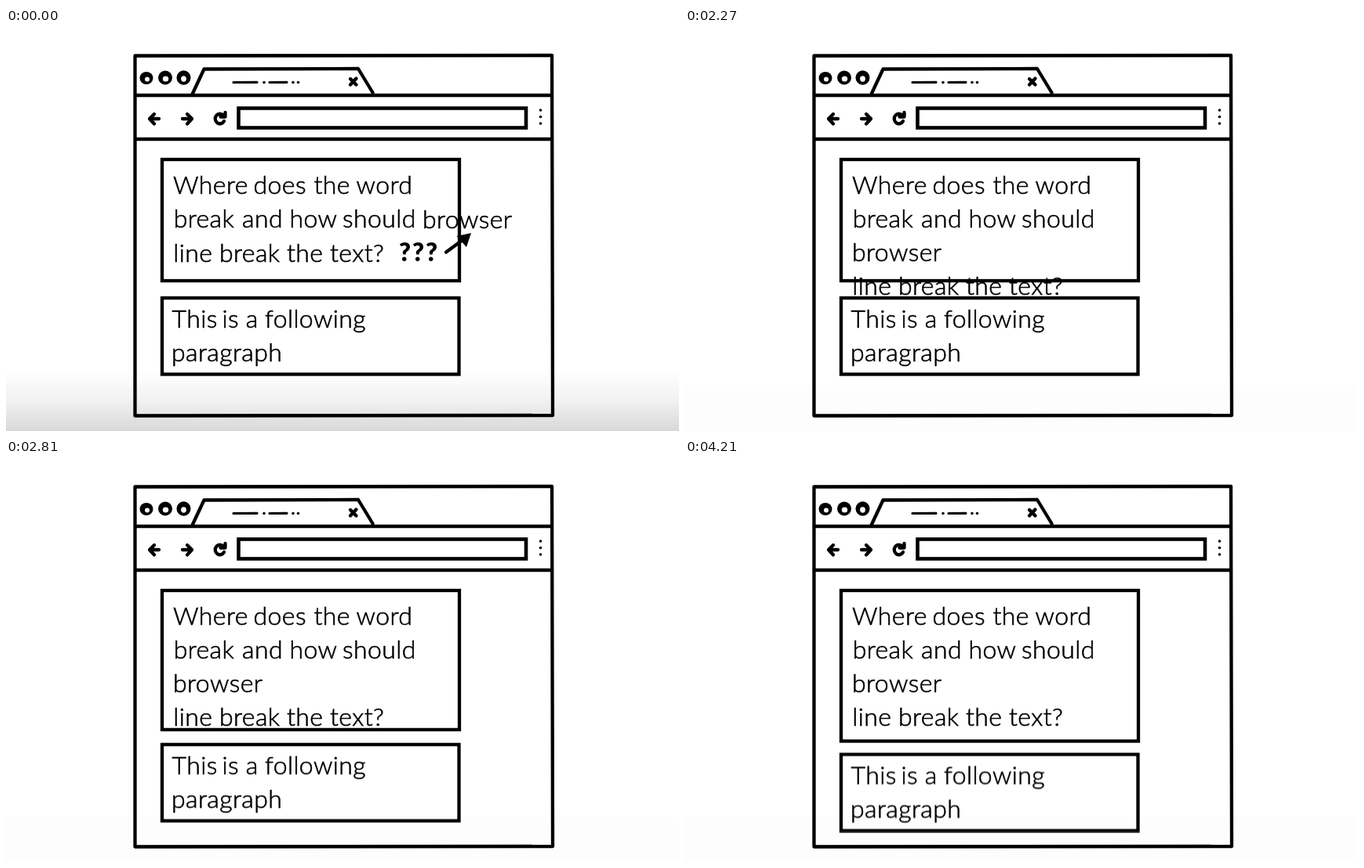
Recreate the animation shown at these times as an HTML page. Size 858 by 515 pixels, loop 4880 ms.

```html
<!DOCTYPE html>
<html lang="en">
<head>
<meta charset="utf-8">
<title>Line breaking</title>
<style>
  html, body { margin: 0; width: 100%; height: 100%; overflow: hidden; background: #fff; }
  svg { display: block; width: 858px; height: 515px; }

  .ink { fill: none; stroke: #000; stroke-width: 4.3; stroke-linecap: round; stroke-linejoin: round; }
  .box { stroke-linejoin: miter; }
  .dot { fill: #000; }
  text { font: 300 32px Lato, "Open Sans", sans-serif; letter-spacing: .4px; fill: #000; stroke: #000; stroke-width: .6px; }
  .marks text { font-weight: 900; letter-spacing: 0; stroke: none; }

  .shade, .marks, .old, .new, .first, .second { animation: 4880ms linear infinite; }
  .shade { animation-name: shade; }
  .marks { animation-name: marks; }
  .old { animation-name: leave; }
  .new { animation-name: enter; }
  .first { animation-name: grow; }
  .second { animation-name: push; }

  @keyframes shade { 0%, .2% { opacity: 1; } 8.2%, 100% { opacity: 0; } }
  @keyframes marks { 0%, 12.3% { opacity: 1; } 21.7%, 100% { opacity: 0; } }
  @keyframes leave { 0%, 23.57% { opacity: 1; } 33.8%, 100% { opacity: 0; } }
  @keyframes enter { 0%, 23.57% { opacity: 0; } 31.76%, 100% { opacity: 1; } }
  @keyframes grow {
    0% { height: 155px; }
    47.44% { height: 155px; animation-timing-function: cubic-bezier(.37, 0, .63, 1); }
    65.27%, 100% { height: 192.5px; }
  }
  @keyframes push {
    0% { transform: translateY(0); }
    47.44% { transform: translateY(0); animation-timing-function: cubic-bezier(.37, 0, .63, 1); }
    65.27%, 100% { transform: translateY(32.5px); }
  }
</style>
</head>
<body>
<svg viewBox="0 0 858 515">
  <defs>
    <linearGradient id="dusk" x1="0" y1="0" x2="0" y2="1">
      <stop offset="0" stop-opacity="0"/>
      <stop offset=".5" stop-opacity=".045"/>
      <stop offset="1" stop-opacity=".145"/>
    </linearGradient>
    <g id="last-line">
      <text><tspan x="213.2">line</tspan> <tspan x="272">break</tspan> <tspan x="358">the</tspan> <tspan x="413">text?</tspan></text>
    </g>
  </defs>

  <rect y="457" width="858" height="58" fill="#fdfdfd"/>
  <rect class="shade" y="437" width="858" height="78" fill="url(#dusk)"/>

  <!-- Browser window -->
  <g class="ink">
    <path d="M164.5 35.5L696 35L697 495L164.5 495.5Z"/>
    <path d="M165 86H696M165 142H696"/>
    <path d="M238 83.5L252.5 52.5L449 52L467.5 82.5"/>
    <path stroke-width="3.2" d="M290 69.5L320 69.3M336 69.5L358 69.3"/>
    <path d="M439 65L446.5 72.5M446.5 64.5L439 72.5"/>
    <path d="M195 116H183M189 110L183 116L189 122.5"/>
    <path d="M225 116H237M231 110L237 116L231 122.5"/>
    <path d="M277 111.5A6 6.3 0 1 0 278 119M279.5 108V113.5H273.5"/>
    <rect class="box" x="296.5" y="102.5" width="366.5" height="25" stroke-width="4.6"/>
  </g>

  <!-- Hand-drawn window buttons: a blob with a low, small hole -->
  <g class="dot">
    <ellipse cx="179" cy="64" rx="8.5" ry="8"/>
    <ellipse cx="203" cy="63.5" rx="9" ry="9"/>
    <ellipse cx="226.5" cy="63.5" rx="9" ry="9.3"/>
  </g>
  <g fill="#fff">
    <ellipse cx="180" cy="65.5" rx="3" ry="3"/>
    <ellipse cx="203.5" cy="65" rx="3.7" ry="3.6"/>
    <ellipse cx="226.5" cy="65" rx="3.4" ry="3.7"/>
  </g>
  <g class="dot">
    <circle cx="329" cy="69.5" r="1.8"/>
    <circle cx="366" cy="69.5" r="1.8"/>
    <circle cx="372.5" cy="69.5" r="1.8"/>
    <circle cx="681.5" cy="105" r="1.8"/>
    <circle cx="681.5" cy="113.5" r="1.8"/>
    <circle cx="681.5" cy="122" r="1.8"/>
  </g>

  <!-- First paragraph -->
  <rect class="ink box first" x="199" y="168" width="379" height="155"/>
  <text y="212.3"><tspan x="213">Where</tspan> <tspan x="315.5">does</tspan> <tspan x="392.5">the</tspan> <tspan x="446.5">word</tspan></text>
  <text y="255.3"><tspan x="213.7">break</tspan> <tspan x="301">and</tspan> <tspan x="361.5">how</tspan> <tspan x="429">should</tspan></text>
  <g class="old">
    <text x="531" y="256">browser</text>
    <use href="#last-line" y="299"/>
  </g>
  <g class="new">
    <text x="213" y="298.3">browser</text>
    <use href="#last-line" y="341.3"/>
  </g>
  <g class="marks">
    <text x="501 518 535" y="298">???</text>
    <path class="ink" stroke-linecap="butt" d="M561 286.5L582 271"/>
    <path class="dot" d="M593 262L574.5 266L587 280Z"/>
  </g>

  <!-- Second paragraph -->
  <g class="second">
    <rect class="ink box" x="199" y="345" width="378.5" height="97.5"/>
    <text y="383"><tspan x="211.5">This</tspan> <tspan x="275.5">is</tspan> <tspan x="305.8">a</tspan> <tspan x="330">following</tspan></text>
    <text x="211" y="426">paragraph</text>
  </g>
</svg>
</body>
</html>
```
